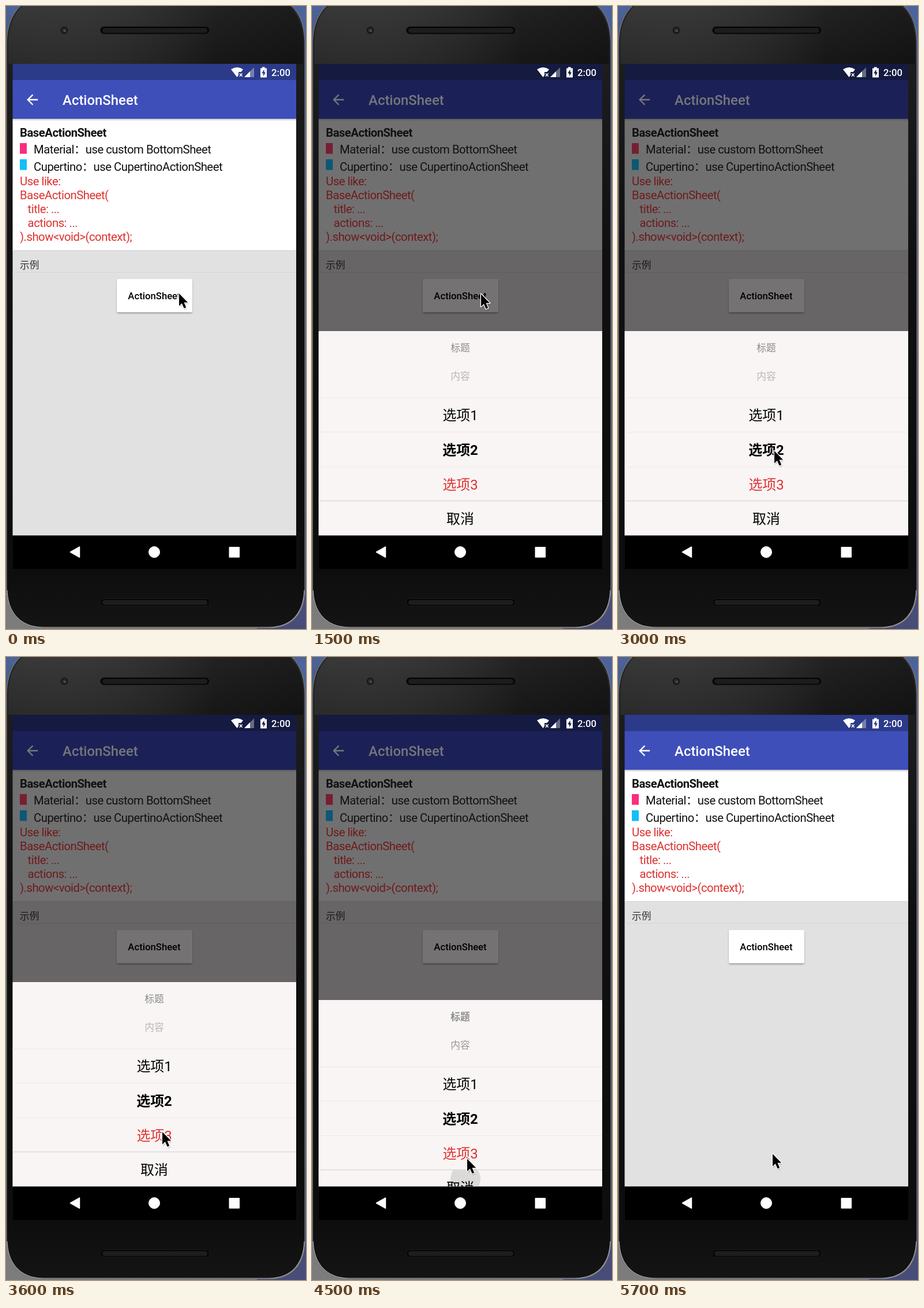
An HTML page for the animation above (6000 ms loop, 520 by 1077 pixels).

```html
<!DOCTYPE html>
<html lang="zh-CN">
<head>
<meta charset="utf-8">
<title>ActionSheet</title>
<style>
html, body { margin: 0; width: 100%; height: 100%; overflow: hidden; background: #0b0b0b; }
svg { display: block; width: 100%; height: 100%; }
text { font-family: Roboto, "Noto Sans CJK SC", "Noto Sans CJK", sans-serif; white-space: pre; }
.body { font-size: 20.3px; letter-spacing: -.49px; fill: #111; }
.code { fill: var(--code); }
.mid { text-anchor: middle; }
.small { font-size: 16.7px; }
.item { font-size: 23.9px; }
.bold { font-weight: 700; }
.medium { font-weight: 500; }
#stage {
  --status: #2c3a8a; --bar: #3e4fba; --title: #fff; --panel: #fff; --ground: #e1e1e1;
  --line: #d6d6d6; --code: #dd3230; --pink: #fc2d7c; --cyan: #14bdfb; --button: #fff; --label: #333;
}
#stage.dim {
  --status: #141a40; --bar: #1b2156; --title: #76767c; --panel: #717071; --ground: #676566;
  --line: #5f5d5e; --code: #6e1b1b; --pink: #761f33; --cyan: #0c5875; --button: #747273; --label: #1a1a1a;
}
#stage.press { --button: #eee9e9; }
</style>
</head>
<body>
<svg id="stage" viewBox="0 0 520 1077" preserveAspectRatio="none">
  <defs>
    <linearGradient id="left" x2="0" y2="1">
      <stop offset="0" stop-color="#4c649c"/><stop offset=".06" stop-color="#4a5878"/>
      <stop offset=".3" stop-color="#6b6b6b"/><stop offset="1" stop-color="#7c7c7c"/>
    </linearGradient>
    <linearGradient id="right" x2="0" y2="1">
      <stop offset="0" stop-color="#4c649c"/><stop offset=".5" stop-color="#55608c"/><stop offset="1" stop-color="#474c78"/>
    </linearGradient>
    <linearGradient id="case" x2="0" y2="1">
      <stop offset="0" stop-color="#2b2b2b"/><stop offset=".09" stop-color="#1d1d1d"/>
      <stop offset=".4" stop-color="#101010"/><stop offset=".9" stop-color="#0d0d0d"/><stop offset="1" stop-color="#141414"/>
    </linearGradient>
    <linearGradient id="sheen">
      <stop offset="0" stop-color="#fff" stop-opacity=".06"/><stop offset=".7" stop-color="#000" stop-opacity=".2"/>
      <stop offset="1" stop-color="#000" stop-opacity=".35"/>
    </linearGradient>
    <linearGradient id="fall" x2="0" y2="1">
      <stop offset="0" stop-color="#000" stop-opacity=".22"/><stop offset="1" stop-color="#000" stop-opacity="0"/>
    </linearGradient>
    <filter id="soft" x="-20%" y="-40%" width="140%" height="180%"><feGaussianBlur id="blur" stdDeviation="1.5"/></filter>
    <filter id="haze" x="-50%" y="-50%" width="200%" height="200%"><feGaussianBlur stdDeviation="1.2"/></filter>
    <clipPath id="screen"><rect x="11.5" y="100" width="491.5" height="815.5"/></clipPath>
    <clipPath id="row"><rect x="12" y="856" width="491" height="60"/></clipPath>
    <path id="arrow" d="M0 0V21.5L4.9 17L8.6 25.6L12.2 24L8.5 15.6H15.2Z"/>
    <g id="speaker">
      <rect x="163.5" y="35.500" width="189" height="13" rx="6.500" fill="#050505" stroke="#1c1c1c"/>
      <rect x="167" y="38" width="182" height="8.500" rx="4.200" fill="#1d1d1d"/>
    </g>
  </defs>

  <rect width="260" height="1077" fill="url(#left)"/>
  <rect x="260" width="260" height="1077" fill="url(#right)"/>
  <rect x="50" y="1070" width="385" height="7" fill="#7b7b7f"/>
  <path d="M1 62C2 30 12 10 29-4H491C508 10 517 30 518 62V1010C517 1048 498 1075 455 1075H65C22 1075 2 1048 1 1010Z" fill="url(#case)" stroke="#777" stroke-width="1.2"/>
  <path d="M4 62C5 32 15 12 31-2H489C505 12 514 32 515 62V100H4Z" fill="url(#sheen)"/>
  <path d="M2 1010C3 1047 23 1074 65 1074H455C497 1074 516 1047 517 1010" fill="none" stroke="#b0b0b0" stroke-width="1.2"/>
  <circle cx="101" cy="42" r="6.5" fill="#1a1a1b"/>
  <circle cx="101" cy="42" r="3.5" fill="#303135"/>
  <circle cx="102" cy="43" r="1.6" fill="#55585f"/>
  <use href="#speaker"/>
  <use href="#speaker" y="989"/>

  <g clip-path="url(#screen)">
    <rect x="11" y="100" width="492" height="28" fill="var(--status)"/>
    <rect x="11" y="422" width="492" height="494" fill="var(--ground)"/>
    <rect x="11" y="195" width="492" height="227" fill="var(--panel)"/>
    <path d="M11 422.5H503M11 460.5H503" stroke="var(--line)"/>
    <rect x="11" y="195" width="492" height="4" fill="url(#fall)"/>
    <rect x="11" y="128" width="492" height="67" fill="var(--bar)"/>
    <path transform="translate(31.3 147.7) scale(1.194)" fill="var(--title)" d="M20 11H7.83l5.59-5.59L12 4l-8 8 8 8 1.41-1.41L7.83 13H20z"/>
    <text x="98" y="171" class="medium" font-size="23.9" fill="var(--title)">ActionSheet</text>

    <g fill="#fff">
      <path d="M390 109.5Q400.5 102.5 411 109.5L407.5 114H403V119.5L400.5 123Z"/>
      <path d="M404.8 116.5L409.6 121.8M409.6 116.5L404.8 121.8" stroke="#fff" stroke-width="1.4"/>
      <path d="M430 106V123H413Z" opacity=".35"/>
      <path d="M423 113V123H413Z"/>
      <path d="M444 105.5H448.5V107.5H452V123.5H441V107.5H444Z"/>
      <path d="M447.5 109.5L443.2 116.5H446V121.5L450 114.5H447.5Z" fill="var(--status)"/>
      <text x="460" y="121" class="small medium">2:00</text>
    </g>

    <g class="body">
      <text x="24" y="226" class="bold">BaseActionSheet</text>
      <rect x="24" y="237" width="12" height="18.5" fill="var(--pink)"/>
      <text x="48" y="255">Material：use custom BottomSheet</text>
      <rect x="24" y="265" width="12" height="18.5" fill="var(--cyan)"/>
      <text x="48" y="285">Cupertino：use CupertinoActionSheet</text>
      <g class="code">
        <text x="24" y="310">Use like:</text>
        <text x="24" y="334">BaseActionSheet(</text>
        <text x="37.6" y="358">title: ...</text>
        <text x="37.6" y="382">actions: ...</text>
        <text x="24" y="406">).show&lt;void&gt;(context);</text>
      </g>
    </g>
    <text x="24" y="453.5" class="small" fill="var(--label)">示例</text>

    <rect id="shade" x="192.5" y="474" width="130" height="57" rx="2" filter="url(#soft)" opacity=".4"/>
    <rect x="192" y="472" width="131" height="57.5" rx="2.5" fill="var(--button)"/>
    <circle id="tap" cx="291" cy="500" r="10" fill="#d6d3d4"/>
    <text x="257" y="507" class="small medium mid">ActionSheet</text>

    <g id="sheet">
      <rect x="11" y="562" width="492" height="354" fill="#f8f5f4"/>
      <path d="M11 677.5H503M11 736.5H503M11 796.5H503" stroke="#ece9e8"/>
      <path d="M11 855.5H503" stroke="#dcdad9" stroke-width="1.3"/>
      <circle id="ripple" cx="266" cy="871" r="26" fill="#dcdad9" clip-path="url(#row)"/>
      <g class="mid">
        <text id="head" x="257" y="597" class="small" fill="#8b8b8b">标题</text>
        <text id="note" x="257" y="646" class="small">内容</text>
        <g class="item">
          <text x="257" y="716">选项1</text>
          <text x="257" y="776" class="bold">选项2</text>
          <text x="257" y="836" fill="#e0302f">选项3</text>
          <text x="257" y="895">取消</text>
        </g>
      </g>
    </g>
  </g>

  <rect x="12" y="915.5" width="491" height="57.5"/>
  <g fill="#fff" stroke="#fff" stroke-linejoin="round">
    <path d="M111.5 944L127.5 935V953Z" stroke-width="1.5"/>
    <circle cx="257" cy="944" r="9.5"/>
    <rect x="387" y="935.5" width="17.5" height="17.5"/>
  </g>

  <g id="cursor">
    <use href="#arrow" x="1" y="2" filter="url(#haze)" opacity=".4"/>
    <use href="#arrow" stroke="#fff" stroke-width="2.6" stroke-linejoin="round"/>
    <use href="#arrow"/>
  </g>
</svg>
<script>
const LOOP = 6000, STEP = 300;
const $ = id => document.getElementById(id);
const set = (id, name, value) => $(id).setAttribute(name, value);
const show = (id, on) => set(id, 'visibility', on ? 'visible' : 'hidden');

// [start ms, tip x, tip y]
const cursorPath = [
  [0, 300, 497], [900, 293, 498], [2100, 276, 700], [2400, 271, 769],
  [3600, 271, 821], [4200, 269, 867.5], [5100, 268, 863], [5400, 268, 860], [5700, 268, 859]
];

function draw(ms) {
  const t = Math.floor(ms / STEP) * STEP;
  const pressed = t === 1200;
  const open = t >= 1500 && t < 4800;
  const closing = t === 4500;

  $('stage').setAttribute('class', open ? 'dim' : pressed ? 'press' : '');
  show('tap', pressed);
  set('blur', 'stdDeviation', pressed ? 4 : 1.5);
  set('shade', 'y', pressed ? 477 : 474);

  set('sheet', 'display', open ? 'inline' : 'none');
  set('sheet', 'transform', `translate(0 ${closing ? 31 : 0})`);
  set('ripple', 'display', closing ? 'inline' : 'none');
  set('head', 'font-weight', closing ? 700 : 400);
  set('note', 'fill', closing ? '#999' : '#b9b7b6');

  const [, x, y] = cursorPath.filter(p => p[0] <= t).pop();
  set('cursor', 'transform', `translate(${x} ${y})`);
}

const start = performance.now();
function tick() {
  draw((performance.now() - start) % LOOP);
  requestAnimationFrame(tick);
}
tick();
</script>
</body>
</html>
```
